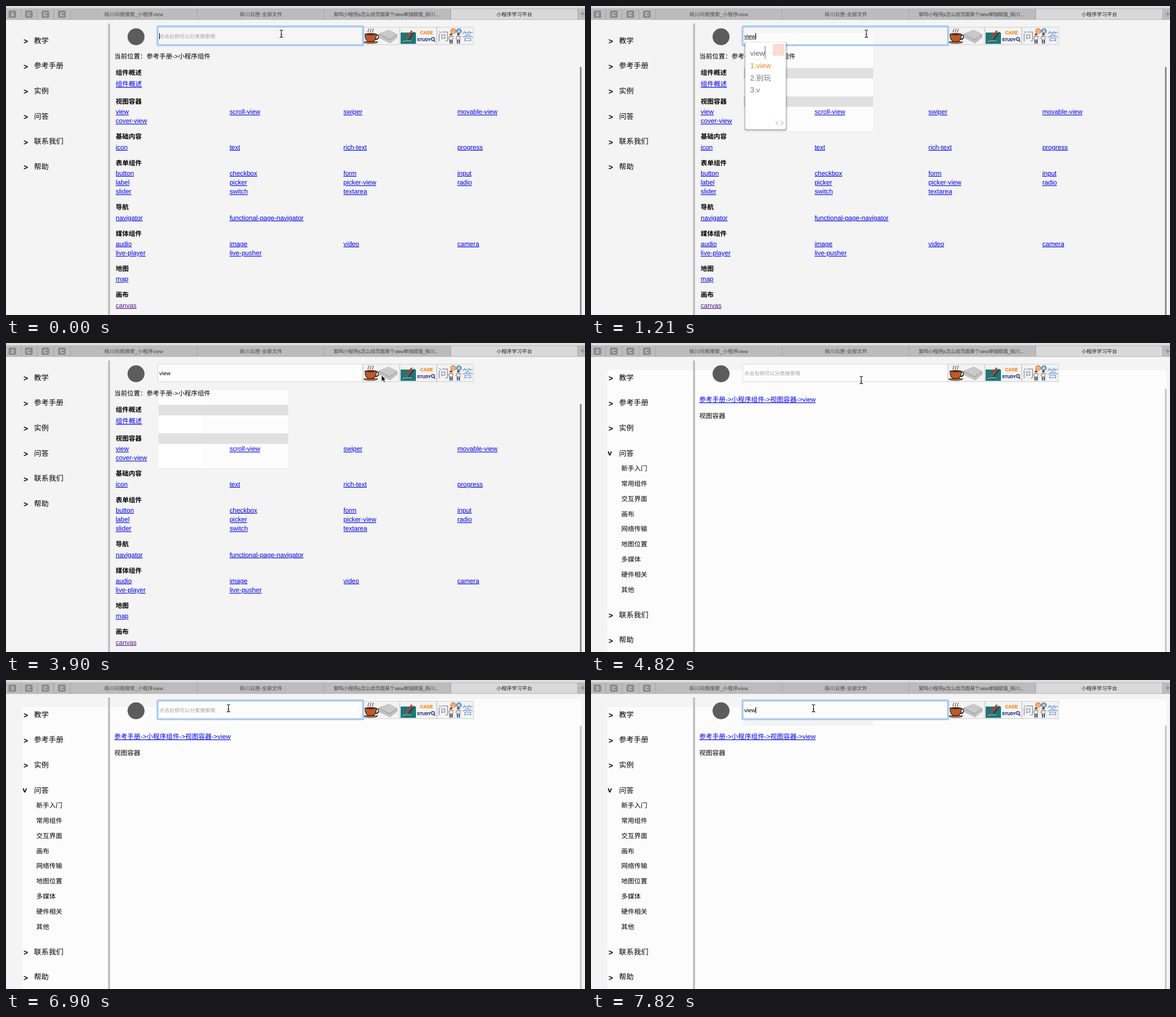
Animation, 1024 px wide and 547 px high, one loop 8 s. Source, as an HTML page:

```html
<!DOCTYPE html>
<html lang="zh-CN">
<head>
<meta charset="utf-8">
<title>小程序学习平台</title>
<style>
html, body { margin: 0; width: 100%; height: 100%; overflow: hidden; background: #f4f4f4; }
svg { display: block; width: 1024px; height: 547px; }
text { font-family: "Liberation Sans", "Noto Sans CJK SC", "Noto Sans CJK", sans-serif; font-size: 11.5px; white-space: pre; text-rendering: geometricPrecision; }
.link { fill: #0000ee; font-size: 11.6px; text-decoration: underline; text-decoration-thickness: 1px; }
.seen { fill: #551a8b; }
.b { font-weight: bold; }
</style>
</head>
<body>
<svg id="stage" viewBox="0 0 1024 547" xmlns="http://www.w3.org/2000/svg"></svg>
<script>
const LOOP = 8000;
const stage = document.getElementById('stage');

function add(parent, tag, attrs, label) {
  const el = document.createElementNS(stage.namespaceURI, tag);
  for (const k in attrs) el.setAttribute(k, attrs[k]);
  if (label !== undefined) el.textContent = label;
  parent.appendChild(el);
  return el;
}
const group = (parent = stage) => add(parent, 'g', {});
const rect = (p, x, y, width, height, fill, more) => add(p, 'rect', { x, y, width, height, fill, ...more });
const text = (p, x, y, label, more) => add(p, 'text', { x, y, ...more }, label);
const path = (p, d, more) => add(p, 'path', { d, fill: 'none', ...more });
const circle = (p, cx, cy, r, fill, more) => add(p, 'circle', { cx, cy, r, fill, ...more });
const show = (el, on) => el.setAttribute('display', on ? 'inline' : 'none');
const size = px => `font-size:${px}px`;

// Backdrops
rect(stage, 0, 0, 1024, 547, '#f4f4f4');
const panel = group(), tint = group(), strip = group();
rect(panel, 29, 48, 989, 499, '#fcfcfc');
rect(tint, 270, 84, 229, 139, '#fcfcfc');
rect(tint, 270, 84, 78, 139, '#ffffff');
const tintTop = rect(tint, 270, 70, 229, 14, '#fcfcfc');
rect(tint, 270, 109.5, 229, 18.5, '#e0e0e0');
rect(tint, 270, 160, 229, 18.5, '#e0e0e0');
rect(tint, 270, 222, 229, 1, '#e6e6e6');
const header = rect(stage, 633, 34, 385, 14, '#fcfcfc');
rect(strip, 270, 70, 229, 11, '#f3f3f3');

// Browser tabs
rect(stage, 0, 0, 1024, 5, '#dedede');
rect(stage, 0, 5, 1024, 19, '#bcbcbc');
rect(stage, 787, 5, 224, 19, '#d9d9d9');
rect(stage, 0, 4.5, 1024, 0.8, '#a8a8a8');
rect(stage, 0, 23.6, 1024, 0.8, '#a5a5a5');
for (const x of [26, 55, 84.5, 114, 338, 562, 786.5, 1011]) rect(stage, x - 0.4, 5, 0.9, 19, '#a0a0a0');
['3', 'C', 'C', 'C'].forEach((s, i) => {
  const x = 4.5 + i * 29.2;
  rect(stage, x, 8, 13.5, 13, '#8b8b8b', { rx: 2.5 });
  text(stage, x + 6.75, 18, s, { class: 'b', style: size(9.5), fill: '#dadada', 'text-anchor': 'middle' });
});
const tab = (x, s, fill, gap = 0) =>
  text(stage, x, 17.7, s, { fill, style: size(9) + `;letter-spacing:${gap}px`, 'text-anchor': 'middle' });
tab(226, '砾川问阁搜索_小程序view', '#484848');
tab(451, '砾川云匣-全部文件', '#484848');
tab(672, '絮鸣小程序js怎么给页面某个view单独赋值_砾川...', '#484848', -0.5);
tab(899, '小程序学习平台', '#1c1c1c');
path(stage, 'M1015.5 14h9M1020 9.5v9', { stroke: '#777' });

// Sidebar
rect(stage, 180.5, 31, 3.5, 516, '#bdbdbd');
function sideItem(p, y, label, open) {
  text(p, open ? 29.5 : 31, y + (open ? 4 : 6), open ? 'v' : '>', { class: 'b', style: size(13.5) });
  text(p, 49.5, y + 4.6, label, { style: size(13) });
}
['教学', '参考手册', '实例'].forEach((s, i) => sideItem(stage, 61 + i * 44.6, s));
const closed = group(), opened = group();
['问答', '联系我们', '帮助'].forEach((s, i) => {
  sideItem(closed, 195 + i * 44.6, s);
  sideItem(opened, i ? 436.4 + i * 44.6 : 195, s, !i);
});
['新手入门', '常用组件', '交互界面', '画布', '网络传输', '地图位置', '多媒体', '硬件相关', '其他']
  .forEach((s, i) => text(opened, 53.5, 226.2 + i * 26.8, s));

// Component list page
const listPage = group(), viewPage = group();
text(listPage, 191.5, 93.3, '当前位置：参考手册->小程序组件', { style: size(11.4) });
const sections = [
  [118, '组件概述', [139, '组件概述']],
  [168.5, '视图容器', [188, 'view scroll-view swiper movable-view'], [204, 'cover-view']],
  [231, '基础内容', [250.5, 'icon text rich-text progress']],
  [277.5, '表单组件', [296.5, 'button checkbox form input'], [313, 'label picker picker-view radio'], [329, 'slider switch textarea']],
  [356, '导航', [375.5, 'navigator functional-page-navigator']],
  [402.5, '媒体组件', [421.5, 'audio image video camera'], [438, 'live-player live-pusher']],
  [465, '地图', [484, 'map']],
  [511, '画布', [530.5, 'canvas']]
];
for (const [y, title, ...rows] of sections) {
  text(listPage, 194, y + 4.2, title, { class: 'b' });
  for (const [ry, names] of rows)
    names.split(' ').forEach((s, i) =>
      text(listPage, 194 + i * 201.4, ry + 3.4, s, { class: s === 'canvas' ? 'link seen' : 'link' }));
}
rect(listPage, 1015, 108, 3, 439, '#8c8c8c');

// Single component page
text(viewPage, 191.5, 104.2, '参考手册->小程序组件->视图容器->view', { class: 'link' });
text(viewPage, 191.5, 132.8, '视图容器');
rect(viewPage, 1015, 81, 3, 466, '#c6c6c6');

// Header emblem
circle(stage, 230, 54.5, 15, '#5c5c5c');

// Search field
const field = rect(stage, 268.5, 37.5, 362.5, 31, '#f6f6f6', { stroke: '#d8d8d8' });
const fieldTint = rect(stage, 270, 48, 229, 20, '#fdfdfd');

// Buttons beside the field
for (let i = 0; i < 3; i++) rect(stage, 631.5 + i * 65.4, 37.5, 64.5, 31, '#f3f3f3', { stroke: '#cfcfcf' });
const ink = { stroke: '#2a1a14', 'stroke-width': 1.2 };
path(stage, 'M641 47q-2-2 0-4t0-3M645 47q-2-2 0-4t0-3M649 47q-2-2 0-4t0-3', { ...ink, 'stroke-width': 0.9 });
path(stage, 'M654 52q6-2 5 3t-7 4', { ...ink, 'stroke-width': 1.8 });
path(stage, 'M635 49.5h20q0 12-6 13.5h-8q-6-2-6-13.5z', { ...ink, fill: '#bd5a2a' });
add(stage, 'ellipse', { cx: 645, cy: 49.8, rx: 9.5, ry: 1.8, fill: '#4a2415' });
path(stage, 'M633 63.5h24q-2 2.5-7 2.5h-10q-5 0-7-2.5z', { ...ink, fill: '#d88b55' });
path(stage, 'M659 49l18-7 15 8v6l-13 10-20-10z', { fill: '#a3a3a3' });
path(stage, 'M659 49l18-7 15 8-14 9z', { fill: '#c9c9c9' });
path(stage, 'M660 52l18 10 13-9M660 54.5l18 10 13-9', { stroke: '#eeeeee', 'stroke-width': 1 });

rect(stage, 698, 47, 27, 20, '#1d7676');
path(stage, 'M707 59l11-15', { stroke: '#c3382c', 'stroke-width': 3 });
path(stage, 'M712 60l10-14', { stroke: '#333', 'stroke-width': 2 });
path(stage, 'M701 63q8-3 16-1', { stroke: '#9fd0cd' });
text(stage, 732.5, 50, 'CASE', { class: 'b', style: size(8), fill: '#f28a1c', stroke: '#f28a1c', 'stroke-width': 0.3 });
text(stage, 727, 62, 'STUDY', { class: 'b', style: size(7.2), fill: '#263a80', stroke: '#263a80', 'stroke-width': 0.3 });
circle(stage, 755, 58.5, 2.8, '#d7dcec', { stroke: '#263a80', 'stroke-width': 1.3 });
path(stage, 'M757 61l2 2.5', { stroke: '#263a80', 'stroke-width': 1.4 });

text(stage, 763.5, 61, '问', { style: size(20) + ';font-weight:300', fill: '#8e99a8' });
text(stage, 806.5, 61, '答', { style: size(20) + ';font-weight:300', fill: '#7e9fd6' });
circle(stage, 791, 44.5, 5, '#e8803c');
circle(stage, 801, 44.5, 5, '#5b9ccc');
const bubble = (x, s) => text(stage, x, 47.2, s, { class: 'b', style: size(7.5), fill: '#fff', 'text-anchor': 'middle' });
bubble(791, 'Q');
bubble(801, 'A');
for (const [x, shirt, pants] of [[787, '#f5f5f5', '#333a4a'], [800, '#e9eef5', '#2d4f87']]) {
  circle(stage, x, 51.5, 2.6, '#e0a57e');
  path(stage, `M${x - 2.6} 51q2.6-5 5.2 0z`, { fill: '#332620' });
  rect(stage, x - 3, 54, 6, 6, shirt, { stroke: '#555', 'stroke-width': 0.7 });
  path(stage, `M${x - 1.5} 60v6.5M${x + 1.8} 60v6.5`, { stroke: pants, 'stroke-width': 2 });
  path(stage, `M${x - 3} 55l-3 3M${x + 3} 55l3-2`, { stroke: '#e0a57e', 'stroke-width': 1.3 });
}

// Focus ring, typed text and caret
const ring = group();
for (const [width, opacity] of [[4.4, 0.4], [2.8, 1]])
  rect(ring, 268, 36.2, 363.6, 33.2, 'none', { rx: 1.5, stroke: '#a9caee', 'stroke-width': width, opacity });
const hint = text(stage, 271, 57, '点击右侧可以分类搜索哦', { style: size(9), fill: '#a2a2a2' });
const typed = text(stage, 271, 57, '', { style: size(10) });
const under = rect(stage, 271, 58.2, 20, 0.9, '#222');
const caret = rect(stage, 271, 48, 1, 11, '#000');

// Input method popup
const popup = group();
const shades = [6, 4, 2].map(d => rect(popup, 0, 0, 0, 0, '#000', { rx: 4, opacity: 0.1, 'data-d': d }));
const card = rect(popup, 273, 64, 72, 154, '#fff', { rx: 3, stroke: '#dcdcdc', 'stroke-width': 0.6 });
const badge = rect(popup, 0, 67, 21, 21, '#fadcd2');
const spell = text(popup, 281.5, 88, '', { style: size(13), fill: '#666' });
const spellCaret = rect(popup, 0, 71, 1, 22, '#555');
const rule = rect(popup, 281, 94, 38, 0.7, '#e8e8e8');
const options = [0, 1, 2, 3, 4].map(i =>
  text(popup, 281.5, 109.6 + i * 21.9, '', { style: size(13), fill: i ? '#757575' : '#f0881e' }));
const vs = group(popup);
rect(vs, 294, 119.5, 14.5, 14, '#f58a1f', { rx: 2.5 });
text(vs, 301.2, 129.8, 'VS', { class: 'b', style: size(8.5), fill: '#fff', 'text-anchor': 'middle' });
const arrows = path(popup, 'M5 0l-4 3 4 3M10 0l4 3-4 3', { stroke: '#f5b199', 'stroke-width': 1.2 });

// Pointer shapes
const beam = group(), arrow = group();
const beamLine = 'M-3-6q3 0 3 2v9q0 2-3 2M3-6q-3 0-3 2v9q0 2 3 2M-1.5 2h3';
path(beam, beamLine, { stroke: '#fff', 'stroke-width': 2.4, opacity: 0.7 });
path(beam, beamLine, { stroke: '#111', 'stroke-width': 1.1 });
path(arrow, 'M0 0v11.2l2.6-2.4 1.9 4.3 2-.9-1.9-4.1h3.5z', { fill: '#000', stroke: '#fff', 'stroke-width': 0.9 });

// Time, then value; each value holds until the next time
const pointer = [
  [0, 487, 48.5, 1], [1960, 494, 51, 1], [2110, 538, 62, 1], [2260, 598, 70, 0], [2400, 646, 66, 0],
  [2550, 664, 57, 0], [4820, 478, 65, 1], [4970, 429, 76, 0], [5260, 414, 84, 0], [5410, 386, 97, 0],
  [5560, 358, 105, 0], [5700, 338, 98, 0], [5850, 358, 78, 0], [6000, 386, 56, 1], [6150, 393.5, 49.5, 1]
];
const typing = [[0, ''], [920, 'v'], [1060, 'vi'], [1210, 'view'], [4060, ''], [7190, 'v'], [7340, 'vi'], [7520, 'view']];
const blinks = [[0, 1], [590, 0], [920, 1], [2110, 0], [2550, 1], [3150, 0], [3600, 1], [3900, 0], [6300, 1], [6900, 0], [7190, 1]];
const choices = {
  v: ['v'],
  vi: ['比', '', '必', '逼', 'v'],
  view: ['view', '别玩', 'v']
};
const advance = { v: 0.5, i: 0.222, e: 0.556, w: 0.722 };

const at = (track, t) => track.reduce((now, key) => key[0] <= t ? key : now);
const within = (t, a, b) => t >= a && t < b;
const place = (el, attrs) => { for (const k in attrs) el.setAttribute(k, attrs[k]); };

function drawPopup(word, em) {
  const width = word === 'view' ? 71.5 : 63, right = 273 + width;
  card.setAttribute('width', width);
  shades.forEach(s => {
    const d = +s.dataset.d;
    place(s, { x: 273 - d / 2, y: 65 - d / 4, width: width + d, height: 154 + d * 0.75 });
  });
  badge.setAttribute('x', right - 23);
  spell.textContent = word;
  spellCaret.setAttribute('x', 281.5 + em * 13);
  rule.setAttribute('width', width === 63 ? 29 : 38);
  options.forEach((el, i) => {
    const s = choices[word][i];
    el.textContent = s === undefined ? '' : `${i + 1}.${s}`;
  });
  show(vs, word === 'vi');
  arrows.setAttribute('transform', `translate(${right - 18.5} 204)`);
}

function draw(t) {
  const second = t >= 4060, expanded = t >= 4210;
  const focused = t < 3900 || t >= 6300;
  const composing = within(t, 920, 1660) || within(t, 7190, 7820);
  const word = at(typing, t)[1];
  const em = [...word].reduce((sum, c) => sum + advance[c], 0);

  show(panel, second);
  show(header, t >= 6300);
  show(tint, within(t, 920, 4060));
  show(tintTop, t < 1960);
  show(strip, t >= 7190);
  show(listPage, !second);
  show(viewPage, second);
  show(closed, !expanded);
  show(opened, expanded);

  field.setAttribute('fill', t < 3900 ? '#f6f6f6' : '#fdfdfd');
  show(fieldTint, within(t, 920, 3900));
  show(ring, focused);
  show(hint, !word);
  typed.textContent = word;
  show(under, composing);
  under.setAttribute('width', em * 10);
  show(caret, at(blinks, t)[1]);
  caret.setAttribute('x', 271 + em * 10);

  show(popup, composing);
  if (composing) drawPopup(word, em);

  const [, x, y, isBeam] = at(pointer, t);
  show(beam, isBeam);
  show(arrow, !isBeam);
  (isBeam ? beam : arrow).setAttribute('transform', `translate(${x} ${y})`);
}

const start = performance.now();
function tick() {
  draw((performance.now() - start) % LOOP);
  requestAnimationFrame(tick);
}
tick();
</script>
</body>
</html>
```
